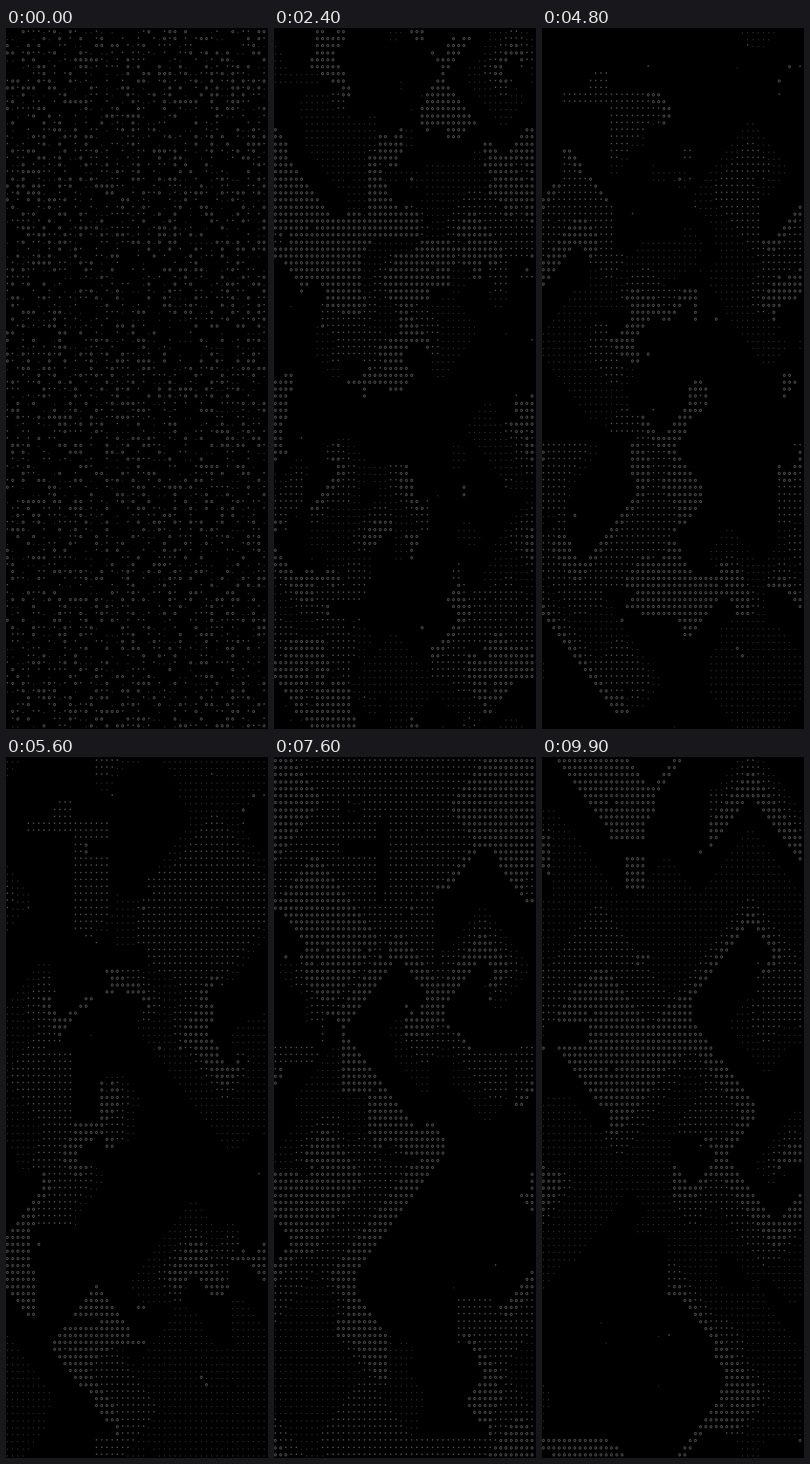
Animation of 458x1222 px, one loop 10 s. Source, as an HTML page with a canvas:

```html
<!DOCTYPE html>
<html>
<head>
<meta charset="utf-8">
<style>
  html, body { margin: 0; height: 100%; background: #000; overflow: hidden; }
  canvas { display: block; }
</style>
</head>
<body>
<canvas id="stage" width="458" height="1222"></canvas>
<script>
const COLS = 50, ROWS = 100, STEPS = 100, STEP_MS = 100, THRESHOLD = 2;
const GLYPHS = ['', '.', '*', 'O', ''];
const STATES = GLYPHS.length;
const ctx = document.getElementById('stage').getContext('2d');
const cellW = 458 / COLS, cellH = 1222 / ROWS;

let seed = 7;
function random() {
  seed = (seed + 0x6D2B79F5) | 0;
  let t = Math.imul(seed ^ (seed >>> 15), 1 | seed);
  t = (t + Math.imul(t ^ (t >>> 7), 61 | t)) ^ t;
  return ((t ^ (t >>> 14)) >>> 0) / 4294967296;
}

// Cyclic automaton on a torus: a cell advances when enough of its
// eight neighbours are one state ahead.
function evolve(cells) {
  return cells.map((state, i) => {
    const x = i % COLS, y = (i - x) / COLS;
    const next = (state + 1) % STATES;
    let ahead = 0;
    for (let dy = -1; dy <= 1; dy++) {
      const row = (y + dy + ROWS) % ROWS * COLS;
      for (let dx = -1; dx <= 1; dx++) {
        if (cells[row + (x + dx + COLS) % COLS] === next) ahead++;
      }
    }
    return ahead >= THRESHOLD ? next : state;
  });
}

const history = [Uint8Array.from({ length: COLS * ROWS }, () => random() * STATES)];
while (history.length < STEPS) history.push(evolve(history[history.length - 1]));

function draw(cells) {
  ctx.fillStyle = '#000';
  ctx.fillRect(0, 0, 458, 1222);
  ctx.fillStyle = '#999';
  ctx.font = '8px "Liberation Mono", monospace';
  cells.forEach((state, i) => {
    const x = i % COLS, y = (i - x) / COLS;
    if (GLYPHS[state]) ctx.fillText(GLYPHS[state], x * cellW, y * cellH + 9);
  });
}

const start = performance.now();
let shown = -1;
function tick() {
  const step = Math.floor((performance.now() - start) / STEP_MS) % STEPS;
  if (step !== shown) draw(history[shown = step]);
  requestAnimationFrame(tick);
}
tick();
</script>
</body>
</html>
```
